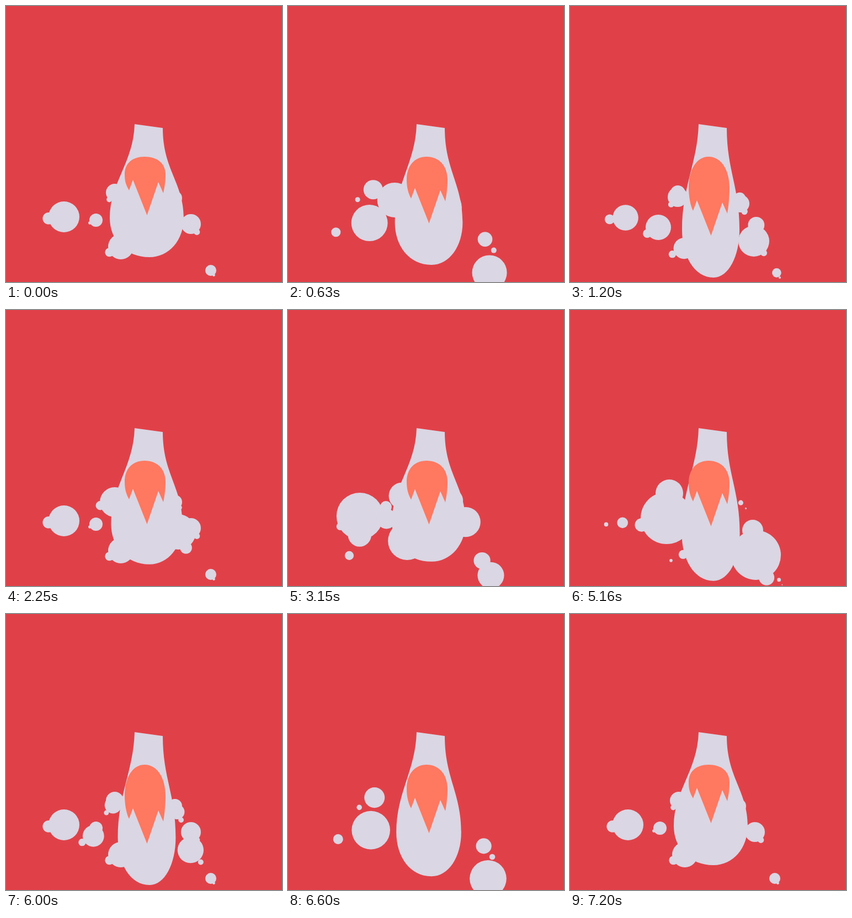
Animation of 500 by 500 pixels, one loop 7.23 s. Source, as an HTML page with a canvas:

```html
<!DOCTYPE html>
<html lang="en">
<head>
<meta charset="utf-8">
<title>Rocket exhaust</title>
<style>
html, body { margin: 0; width: 100%; height: 100%; overflow: hidden; background: #e04149; }
canvas { display: block; width: 500px; height: 500px; }
</style>
</head>
<body>
<canvas id="stage" width="500" height="500"></canvas>
<script>
const ctx = document.getElementById('stage').getContext('2d');
const LOOP = 7230, CYCLE = 7200, STEP = 30, BEAT = 800, LIFE = 1100;
const RED = '#e04149', SMOKE = '#dad6e3', FIRE = '#ff7860';
const NOZZLE = { x: 255, y: 330 };

const lerp = (a, b, k) => a + (b - a) * k;
const pulse = turns => Math.sin(Math.PI * turns) ** 2;
const spread = p => 1 - (1 - p) ** 3;
const swell = p => p < 0.25 ? p / 0.25 : (1 - p) / 0.75;

let seed = 7;
function random() {
  seed = (seed * 16807) % 2147483647;
  return seed / 2147483647;
}

// A puff drags one small crumb along its lower outer rim.
function puff(x, y, r) {
  const side = x < NOZZLE.x ? -1 : 1;
  const a = lerp(0.1, 1.2, random());
  const crumb = { x: x + side * r * Math.cos(a), y: y + r * Math.sin(a), r: r * lerp(0.2, 0.4, random()) };
  return [{ x, y, r }, crumb];
}

// A burst has its puffs in the given places, at the given share of life, at each moment.
const burst = (moments, age, ...spots) => ({ moments, age, puffs: spots.flatMap(s => puff(...s)) });

const bursts = [
  burst([0, 1125, 2250, 3375, 4875, 6000, 7200], 0.6,
    [105, 382, 28], [163, 388, 12], [197, 338, 16], [208, 436, 23], [335, 395, 18], [306, 348, 13], [371, 479, 10]),
  burst([1200, 5940], 0.65, [160, 401, 23], [333, 426, 28], [195, 346, 18], [309, 358, 16]),
  burst([2250], 0.35, [197, 348, 27], [312, 402, 32]),
  burst([1640, 2900, 4050], 0.45, [143, 356, 38], [147, 397, 36], [188, 353, 18], [352, 460, 41]),
  burst([400, 5160, 6400], 0.3, [175, 377, 47], [180, 332, 25], [337, 444, 45], [331, 399, 19])
];

function circle(x, y, r) {
  ctx.beginPath();
  ctx.arc(x, y, r, 0, Math.PI * 2);
  ctx.fill();
}

function drawBurst({ moments, age, puffs }, t) {
  for (const moment of moments) {
    const p = age + (t - moment) / LIFE;
    if (p <= 0 || p >= 1) continue;
    const reach = spread(p) / spread(age), size = swell(p) / swell(age);
    for (const { x, y, r } of puffs) {
      circle(lerp(NOZZLE.x, x, reach), lerp(NOZZLE.y, y, reach), r * size);
    }
  }
}

// k goes from short and wide (0) to long and narrow (1).
function drawPlume(k) {
  const w = lerp(67, 52, k), left = 255 - w, right = 255 + w;
  const belly = lerp(384, 405, k), end = lerp(455, 492, k);
  const shoulder = belly - lerp(64, 78, k), hip = lerp(belly, end, 0.56);
  ctx.beginPath();
  ctx.moveTo(233, 214);
  ctx.lineTo(284, 221);
  ctx.bezierCurveTo(284, 297, right, shoulder, right, belly);
  ctx.bezierCurveTo(right, hip, 258 + w * 0.56, end, 260, end);
  ctx.bezierCurveTo(258 - w * 0.62, end, left, hip, left, belly);
  ctx.bezierCurveTo(left, shoulder, 231, 284, 233, 214);
  ctx.fill();
}

function drawFlame(k) {
  const drop = 37 * k, side = 305 + drop * 0.67, brow = 285 + drop * 0.32;
  ctx.beginPath();
  ctx.moveTo(223, 334 + drop);
  ctx.bezierCurveTo(218, 325 + drop, 215, side + 14, 215, side);
  ctx.bezierCurveTo(215, brow, 229, 273, 251, 273);
  ctx.bezierCurveTo(274, 273, 289, brow, 289, side);
  ctx.bezierCurveTo(289, side + 14, 287, 330 + drop, 285, 339 + drop);
  ctx.lineTo(276, 319 + drop);
  ctx.lineTo(255.5, 379 + drop);
  ctx.lineTo(230, 315 + drop);
  ctx.fill();
}

function draw(t) {
  const x = t / CYCLE, turns = t / BEAT;
  ctx.fillStyle = RED;
  ctx.fillRect(0, 0, 500, 500);
  ctx.fillStyle = SMOKE;
  bursts.forEach(b => drawBurst(b, t));
  drawPlume(pulse(turns + 0.14 * pulse(x ** 1.3)));
  ctx.fillStyle = FIRE;
  drawFlame(pulse(turns - 0.6 * x * x * Math.sin(6 * Math.PI * x)));
}

const start = performance.now();
function tick() {
  const t = (performance.now() - start) % LOOP;
  draw(Math.floor(t / STEP) * STEP % CYCLE);
  requestAnimationFrame(tick);
}
tick();
</script>
</body>
</html>
```
